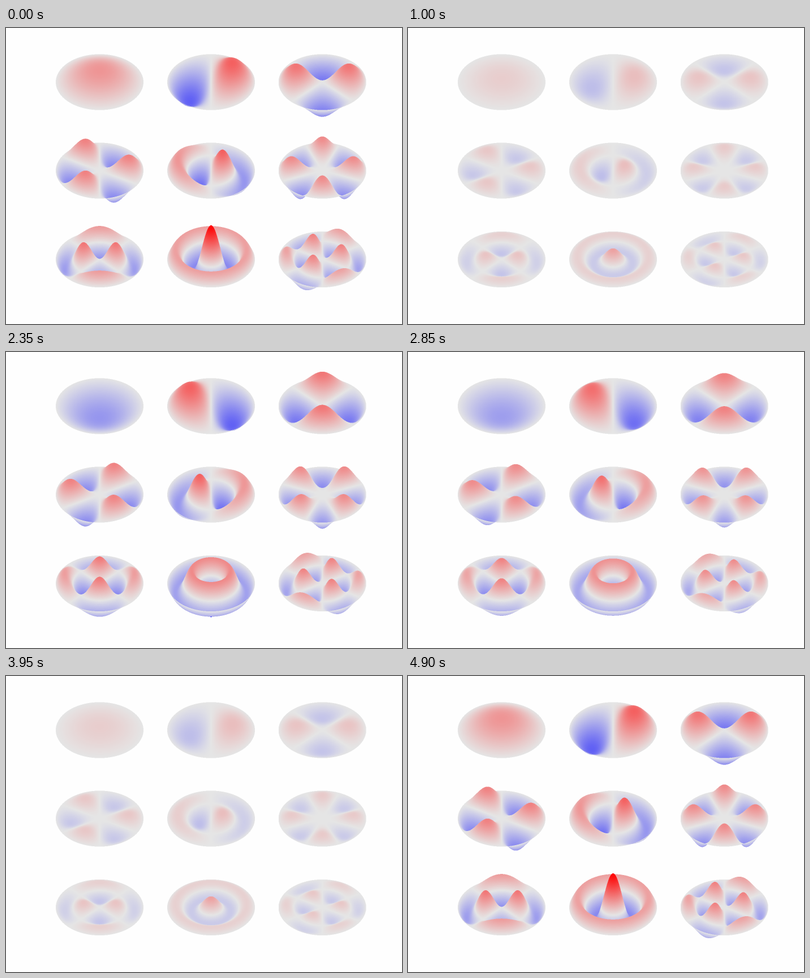
An HTML page with a canvas that plays this animation: 700x525 px, repeating every 4.95 s.

```html
<!DOCTYPE html>
<html lang="en">
<head>
<meta charset="utf-8">
<title>Drum modes</title>
<style>
  html, body { margin: 0; width: 100%; height: 100%; overflow: hidden; background: #fefefe; }
  canvas { display: block; width: 700px; height: 525px; }
</style>
</head>
<body>
<canvas id="stage" width="1400" height="1050"></canvas>
<script>
const SCALE = 2, W = 700 * SCALE, H = 525 * SCALE;
const RX = 77.5 * SCALE, RY = 49.6 * SCALE, LIFT = 60 * SCALE;
const STEP_MS = 50, STEPS = 99;
const COLS = [165.5, 362.5, 559.2], ROWS = [96, 253, 410.5];

// [angular order, zero of the Bessel function, amplitude]
const MODES = [
  [0, 2.4048, 0.35], [1, 3.8317, 1], [2, 5.1356, 1],
  [3, 6.3802, 1], [1, 7.0156, 1], [4, 7.5883, 1],
  [2, 8.4172, 1], [0, 8.6537, 1], [3, 9.761, 1]
];

const ctx = document.getElementById('stage').getContext('2d');
const image = ctx.createImageData(W, H);
const pixels = new Uint32Array(image.data.buffer);
const rgb = (r, g, b) => (255 << 24 | b << 16 | g << 8 | r) >>> 0;
const PAPER = rgb(254, 254, 254);

// Blue for -1, grey for 0, red for +1
const HALF = 512;
const palette = Uint32Array.from({ length: 2 * HALF + 1 }, (_, i) => {
  const v = i / HALF - 1, a = Math.abs(v);
  const strong = Math.round(229 + 26 * a), weak = Math.round(229 * (1 - a));
  return v > 0 ? rgb(strong, weak, weak) : rgb(weak, weak, strong);
});

function bessel(m, x) {
  const n = 40;
  let sum = 0;
  for (let i = 0; i < n; i++) {
    const a = (i + 0.5) * Math.PI / n;
    sum += Math.cos(m * a - x * Math.sin(a));
  }
  return sum / n;
}

// Vertical slices of a membrane, each sampled from back to front
function buildMode([m, zero, amp], index) {
  const N = 600;
  const radial = Array.from({ length: N + 2 }, (_, i) => amp * bessel(m, zero * i / N));
  const cx = COLS[index % 3] * SCALE, cy = ROWS[Math.floor(index / 3)] * SCALE;
  const slices = [];
  for (let px = Math.ceil(cx - RX); px < cx + RX - 0.5; px++) {
    const x = (px + 0.5 - cx) / RX;
    if (Math.abs(x) >= 1) continue;
    const chord = Math.sqrt(1 - x * x);
    const count = Math.max(4, Math.ceil(chord * 300));
    const ground = new Float32Array(count + 1), height = new Float32Array(count + 1);
    for (let i = 0; i <= count; i++) {
      const y = chord * (1 - 2 * i / count);
      const r = Math.min(1, Math.hypot(x, y)) * N, k = Math.floor(r);
      const shape = radial[k] + (radial[k + 1] - radial[k]) * (r - k);
      ground[i] = cy - RY * y;
      height[i] = shape * Math.cos(m * Math.atan2(y, x));
    }
    slices.push({ px, ground, height });
  }
  return slices;
}

const slices = MODES.flatMap(buildMode);

function drawSlice({ px, ground, height }, swing) {
  const lift = LIFT * swing;
  let last = Math.round(ground[0] - lift * height[0]);
  for (let i = 1; i < ground.length; i++) {
    const y = Math.round(ground[i] - lift * height[i]);
    if (y === last) continue;
    const value = swing * (height[i] + height[i - 1]) / 2;
    const color = palette[Math.round((value + 1) * HALF)];
    const end = Math.max(y, last);
    for (let row = Math.min(y, last); row < end; row++) pixels[row * W + px] = color;
    last = y;
  }
}

function draw(step) {
  const swing = Math.cos(2 * Math.PI * step / STEPS);
  pixels.fill(PAPER);
  for (const slice of slices) drawSlice(slice, swing);
  ctx.putImageData(image, 0, 0);
}

const start = performance.now();
let shown = -1;
function tick() {
  const step = Math.floor((performance.now() - start) / STEP_MS) % STEPS;
  if (step !== shown) draw(shown = step);
  requestAnimationFrame(tick);
}
tick();
</script>
</body>
</html>
```
